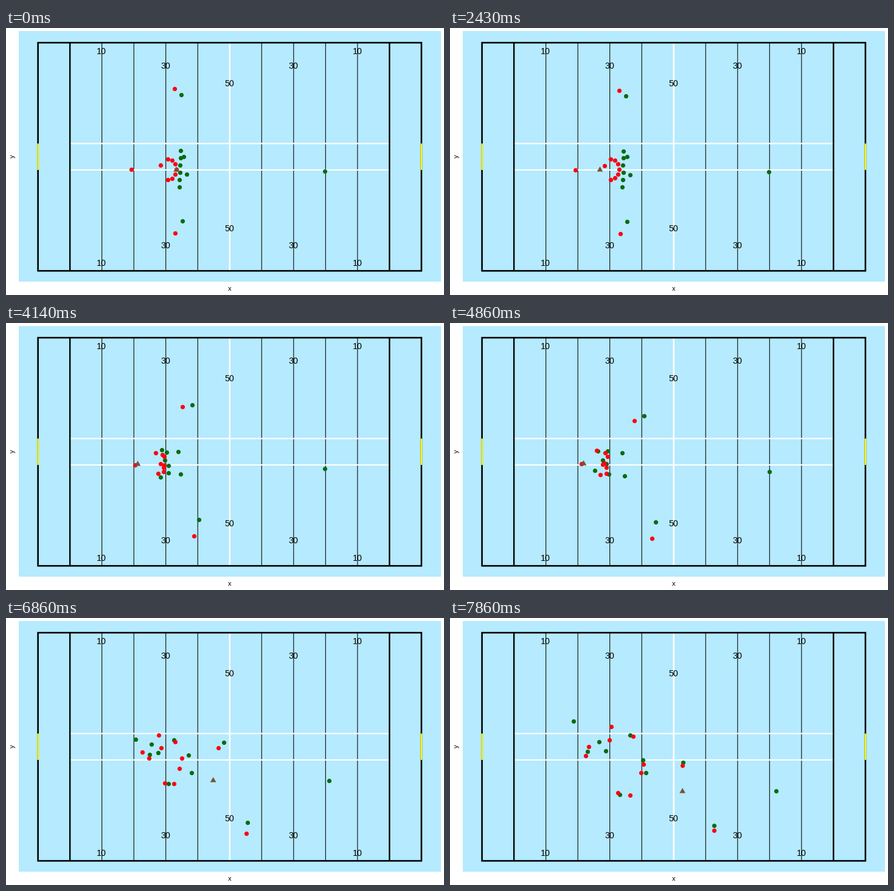
A matplotlib script for the animation above (8000 ms loop, 720 px wide and 440 px high).

```python
import numpy as np
import matplotlib.pyplot as plt
from matplotlib.animation import FuncAnimation
from matplotlib.patches import Polygon, Rectangle

W, H, DPI = 720, 440, 100
PT = 72 / DPI  # points per pixel
FRAMES = 56
SNAP, CATCH, KICK = 13, 21, 34
RED, GREEN, BROWN = "#fc0010", "#0b6b10", "#7a5238"
SKY, YELLOW = "#b5eaff", "#fdfb0a"

LEFT, RIGHT, TOP, BOTTOM = 52.6, 682.9, 24.2, 400.2
HASHES = (190.4, 233.9)

plt.rcParams["font.family"] = "Liberation Sans"
fig = plt.figure(figsize=(W / DPI, H / DPI), dpi=DPI, facecolor="white")
ax = fig.add_axes([0, 0, 1, 1])
ax.set(xlim=(0, W), ylim=(H, 0))
ax.axis("off")


def line(xs, ys, color, width, z):
    ax.plot(xs, ys, color=color, lw=width * PT, zorder=z,
            solid_capstyle="butt", snap=False)


def label(x, y, text, size, **style):
    ax.text(x, y, text, fontsize=size * PT, zorder=5,
            **{"ha": "center", "va": "baseline", **style})


def yard_x(yards):
    return LEFT + (RIGHT - LEFT) * (yards + 10) / 120


def draw_field():
    ax.add_patch(Rectangle((21.3, 5.5), 693.2, 413, color=SKY, lw=0, zorder=0))
    for yards in range(10, 100, 10):
        middle = yards == 50
        line([yard_x(yards)] * 2, (TOP, BOTTOM), "white" if middle else "black",
             2.6 if middle else 1.07, 2 if middle else 1)
    for y in HASHES:
        line((yard_x(0), yard_x(100)), (y, y), "white", 2.2, 2)
    for yards in (0, 100):
        line([yard_x(yards)] * 2, (TOP, BOTTOM), "black", 2.4, 3)
    ax.add_patch(Rectangle((LEFT, TOP), RIGHT - LEFT, BOTTOM - TOP, fill=False,
                           ec="black", lw=2.6 * PT, zorder=3, snap=False))
    for x in (LEFT, RIGHT):
        line((x, x), HASHES, YELLOW, 2.6, 4)

    for number, upper, lower in [(10, 43.2, 392.2), (30, 67.2, 363.3),
                                 (50, 96, 335.2)]:
        for yards in {number, 100 - number}:
            for y in (upper, lower):
                label(yard_x(yards) - 0.4, y, str(number), 14.2)
    label(367.6, 433, "x", 11)
    label(11, 211.4, "y", 11, va="center", rotation=90)


def run(points):
    """Smooth paths through the places at snap, kick and end."""
    keys = np.array([SNAP + 1, KICK, FRAMES - 1], float)
    slopes = np.gradient(points, keys, axis=0, edge_order=2)
    slopes[0] = 0
    t = np.maximum(np.arange(FRAMES), keys[0])
    i = (t >= KICK).astype(int)
    h = (keys[i + 1] - keys[i])[:, None, None]
    u = (t - keys[i])[:, None, None] / h
    a, b = points[i], points[i + 1]
    return (a + (b - a) * u * u * (3 - 2 * u)
            + h * u * (1 - u) * ((1 - u) * slopes[i] - u * slopes[i + 1]))


def team(line_up, targets, others):
    """Line-up places joined to their (kick, end) targets, plus free players."""
    blockers = np.concatenate([line_up[:, None], np.array(targets)], axis=1)
    return run(np.concatenate([blockers, np.array(others)]).swapaxes(0, 1))


# Kicking side lines up on a half ellipse, the rush in a straight column
angle = np.linspace(-np.pi / 2, np.pi / 2, 7)
arc = np.column_stack([265.5 + 14 * np.cos(angle), 233 + 17 * np.sin(angle)])
column = np.linspace((287, 202), (285, 262), 6)

paths = {
    GREEN: team(
        column,
        [[(243, 211), (244.5, 204.5)],
         [(258.5, 211), (296, 193.5)],
         [(251, 226), (256, 219.5)],
         [(256.5, 232), (225.5, 220.5)],
         [(260.5, 249.5), (278.5, 291.5)],
         [(238, 243), (202.5, 170)]],
        [[(288, 110.5), (319, 153), (382.5, 238)],
         [(289.5, 318.5), (337.5, 328), (434, 342)],
         [(292, 212), (282.5, 214), (317, 234.5)],
         [(296.5, 241.5), (286.5, 252.5), (321.5, 255)],
         [(524, 236.5), (525, 245), (536, 285.5)]]),
    RED: team(
        arc,
        [[(240.5, 210.5), (265, 179.5)],
         [(255, 214.5), (301, 195.5)],
         [(259, 220), (317.5, 241)],
         [(253.5, 231), (262, 201.5)],
         [(256.5, 238.5), (313.5, 255.5)],
         [(257, 248.5), (295.5, 292)],
         [(247, 250.5), (276, 288.5)]],
        [[(277, 100.5), (302.5, 161), (381.5, 243)],
         [(278, 338.5), (332, 355.5), (434, 350.5)],
         [(254, 226.5), (251, 233.5), (223, 227.5)],
         [(205.5, 233.5), (216, 232), (228, 212.5)]]),
}


def ball_at(k):
    """Still, snapped back, carried, then kicked with slowing flight."""
    times = (SNAP, CATCH, KICK)
    u = max(k - KICK, 0)
    x = np.interp(k, times, (280, 213, 219.6)) + 10.45 * u - 0.129 * u * u
    y = np.interp(k, times, (234, 233.6, 231.8)) + 2.57 * u
    return np.array([x, y])


TRIANGLE = 5.6 * np.array([[0, -1], [0.866, 0.5], [-0.866, 0.5]])

draw_field()
dots = {c: ax.scatter(*p[0].T, s=(7.2 * PT) ** 2, color=c, lw=0, zorder=6 + i)
        for i, (c, p) in enumerate(paths.items())}
ball = ax.add_patch(Polygon(ball_at(0) + TRIANGLE, color=BROWN, lw=0, zorder=8))


def update(k):
    for color, path in paths.items():
        dots[color].set_offsets(path[k])
    ball.set_xy(ball_at(k) + TRIANGLE)
    return [*dots.values(), ball]


anim = FuncAnimation(fig, update, frames=FRAMES, interval=8000 / FRAMES,
                     repeat=True, repeat_delay=0, blit=False)
plt.show()
```
